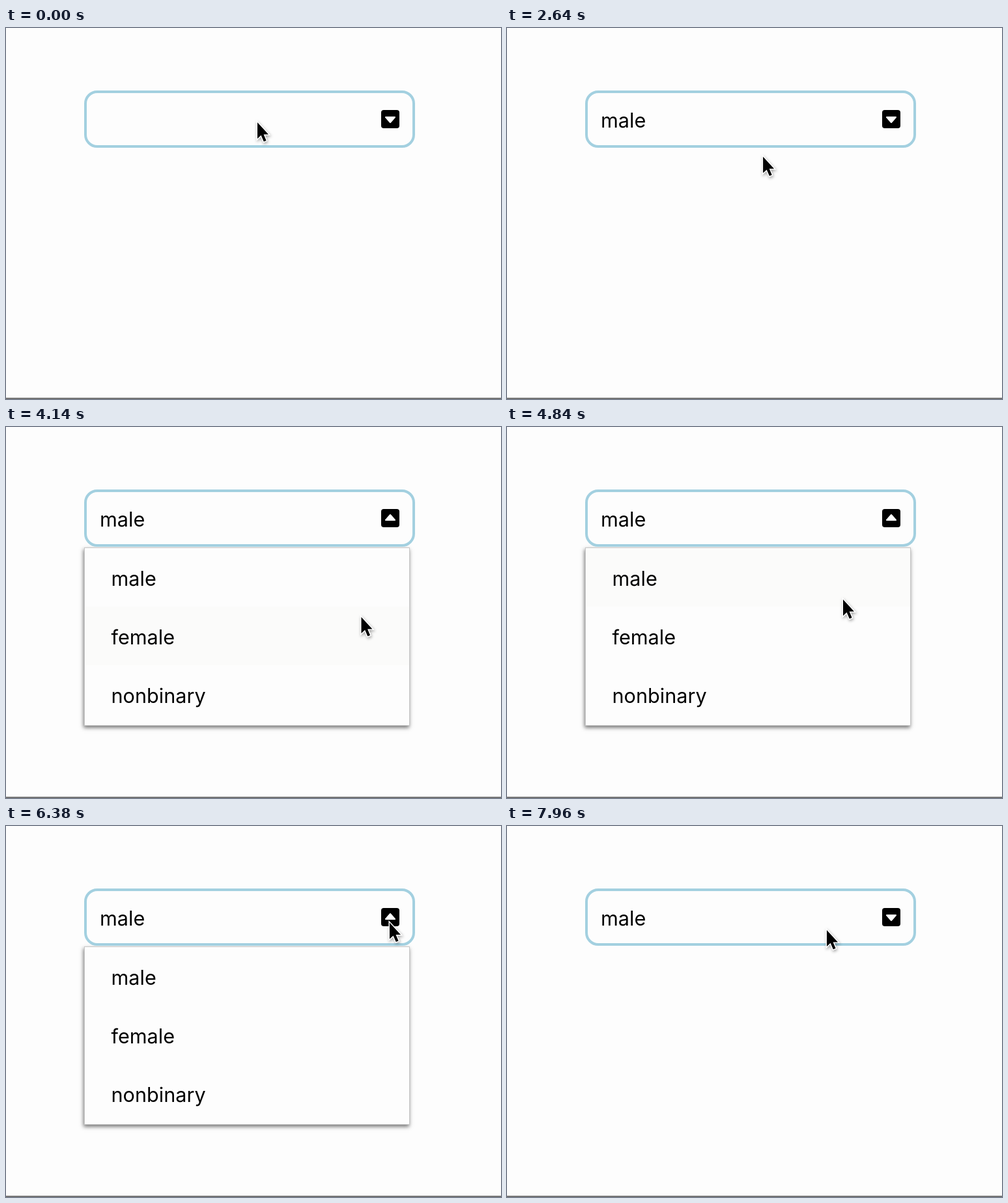
An HTML page that plays this animation: 760x570 px, repeating every 8000 ms.

```html
<!DOCTYPE html>
<html lang="en">
<head>
<meta charset="utf-8">
<title>Dropdown</title>
<style>
  html, body { margin: 0; width: 100%; height: 100%; overflow: hidden; background: #fdfdfd; }
  svg { position: absolute; left: 0; top: 0; }
  text { font: 30.6px Inter, "Open Sans", sans-serif; fill: #000; }
  #panel {
    position: absolute; left: 120px; top: 185px; width: 500px; height: 274px;
    box-sizing: border-box; border: 1px solid #c8c8c8; background: #fdfdfd;
    box-shadow: -1px 3px 6px rgba(0, 0, 0, .55);
  }
  #cursor { filter: drop-shadow(1px 2px 2px rgba(0, 0, 0, .35)); }
</style>
</head>
<body>
<div id="panel"></div>
<svg width="760" height="570">
  <rect y="568" width="760" height="2" fill="#777"/>
  <g id="options"></g>
  <rect x="122" y="98" width="504" height="84" rx="18" fill="#fdfdfd" stroke="#a3d0e0" stroke-width="4"/>
  <text id="value" x="144" y="152.5">male</text>
  <rect x="576" y="126" width="28" height="28" rx="4"/>
  <path id="arrow" fill="#fff" stroke="#fff" stroke-width="2" stroke-linejoin="round"/>
  <path id="cursor" d="M0 0V25L5.6 19.8L9.8 29.5L13.6 27.9L9.6 18.4H17Z"
    stroke="#fff" stroke-width="3" paint-order="stroke"/>
</svg>
<script>
const $ = id => document.getElementById(id);
const LOOP = 8000, ROW = 90;

// Key points of the pointer: time, x, y
const path = [
  [500, 386, 145], [1340, 390, 108], [1620, 398, 197], [2080, 402, 246],
  [2920, 390, 181], [3480, 420, 392], [3720, 436, 322], [4000, 470, 230],
  [4400, 696, 450], [4700, 502, 385], [4840, 516, 265], [5200, 682, 190],
  [5440, 586, 171], [6240, 588, 146], [6940, 594, 197], [7320, 570, 330],
  [7740, 487, 144], [7960, 491, 160]
];
const clicks = [760, 2420, 2800, 5740, 6320, 6760];
const rowTop = i => 186 + ROW * i;

$("options").innerHTML = ["male", "female", "nonbinary"].map((label, i) =>
  `<rect x="121" y="${rowTop(i)}" width="498" height="${ROW}" fill="#fbfbfa"/>
   <text x="161.5" y="${rowTop(i) + 57.5}">${label}</text>`).join("");
const shades = $("options").querySelectorAll("rect");

// Movement freezes for 100 ms after every 740 ms, and from 6000 to 6240.
function hold(t) {
  if (t < 6240) t = Math.min(t, 6000);
  const start = t > 6000 ? 6240 : 500;
  const phase = Math.max(0, t - start) % 840;
  return Math.max(t, 500) - Math.max(0, phase - 740);
}

const slope = (i, k) => {
  const a = path[i], b = path[i + 1];
  return a && b ? (b[k] - a[k]) / (b[0] - a[0]) : 0;
};
const tangent = (i, k) => {
  const a = slope(i - 1, k), b = slope(i, k);
  return a * b > 0 ? 2 * a * b / (a + b) : 0;
};

// Smooth curve through the key points, without overshoot
function pointer(t) {
  t = Math.min(t, 7960);
  let i = 0;
  while (i < path.length - 2 && path[i + 1][0] <= t) i++;
  const a = path[i], b = path[i + 1], d = b[0] - a[0], u = (t - a[0]) / d, v = 1 - u;
  return [1, 2].map(k =>
    v * v * (1 + 2 * u) * a[k] + u * u * (3 - 2 * u) * b[k] +
    d * u * v * (v * tangent(i, k) - u * tangent(i + 1, k)));
}

const show = (id, on) => $(id).style.display = on ? "" : "none";

function draw(now) {
  const t = hold(now % LOOP), [x, y] = pointer(t);
  const clicked = clicks.filter(c => c <= t).length, open = clicked % 2 === 1;
  show("panel", open);
  show("options", open);
  show("value", clicked > 1);
  $("arrow").setAttribute("d", open ? "M583 143L590 135L597 143Z" : "M583 137L590 145L597 137Z");
  shades.forEach((shade, i) => {
    const over = x > 120 && x < 620 && y >= rowTop(i) && y < rowTop(i + 1);
    shade.setAttribute("opacity", over ? 1 : 0);
  });
  $("cursor").setAttribute("transform", `translate(${x} ${y})`);
}

let begin;
function tick(now) {
  begin ??= now;
  draw(now - begin);
  requestAnimationFrame(tick);
}
draw(0);
requestAnimationFrame(tick);
</script>
</body>
</html>
```
